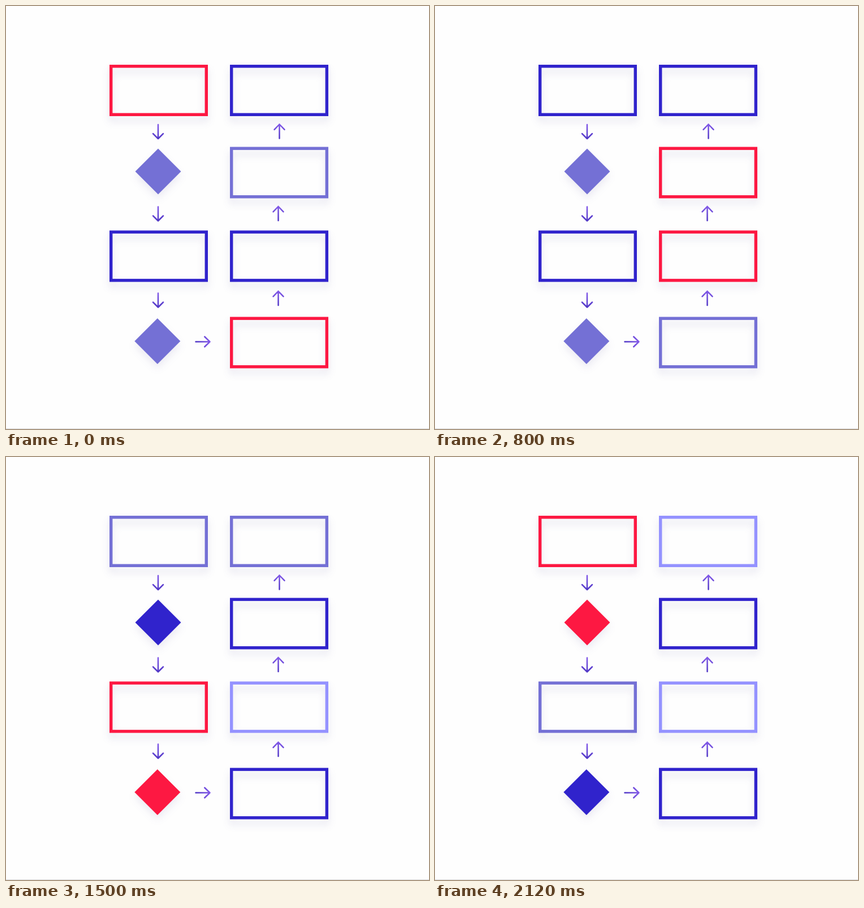
Animation, 748 px wide and 749 px high, one loop 2560 ms. Source, as an HTML page:

```html
<!DOCTYPE html>
<html lang="en">
<head>
<meta charset="utf-8">
<title>Flow chart</title>
<style>
  html, body { margin: 0; width: 100%; height: 100%; overflow: hidden; background: #fefefe; }
  svg { display: block; width: 748px; height: 749px; }
  .box { fill: none; stroke-width: 5.4; filter: drop-shadow(0 9px 7px rgba(50, 40, 130, .14)); }
  .gem { filter: drop-shadow(0 8px 7px rgba(50, 40, 130, .09)); }
  .arrow { fill: none; stroke: url(#ink); stroke-width: 2.5; stroke-linecap: round; stroke-linejoin: round; }
</style>
</head>
<body>
<svg id="stage" viewBox="0 0 748 749">
  <defs>
    <linearGradient id="ink" x1="0" y1="0" x2="0" y2="1">
      <stop offset="0" stop-color="#8259e8"/>
      <stop offset="1" stop-color="#5138c6"/>
    </linearGradient>
  </defs>
  <rect y="748" width="748" height="1" fill="#d9d9dc"/>
</svg>
<script>
const LOOP = 2560;
const COLORS = { r: '#fd1842', d: '#3023cc', l: '#7470d5', p: '#9492ff' };

// Cells follow the arrows, from top left round to top right.
const CELLS = [
  ['box', 183, 104], ['gem', 269, 293], ['box', 183, 397.5], ['gem', 267.8, 593.5],
  ['box', 396, 550.5], ['box', 396, 397.5], ['box', 396, 249.5], ['box', 396, 104]
];

// Start time and one colour key per cell.
const STEPS = [
  [0, 'rldlrdld'],
  [420, 'ldldrrdl'],
  [630, 'dldllrrd'],
  [840, 'ldlddlrr'],
  [1100, 'dldrldlr'],
  [1340, 'ldrrdpdl'],
  [1520, 'drrlldld'],
  [1680, 'rrlddpdp']
];

const DOWN = 'M0 0V25M-9 16L0 25L9 16';
const UP = 'M0 25V0M-9 9.3L0 0L9 9.3';
const ARROWS = [
  [DOWN, 269, 210], [DOWN, 269, 355.5], [DOWN, 269, 508.5],
  [UP, 483.5, 209.5], [UP, 481.5, 355], [UP, 481.5, 505],
  [UP, 360.5, 594.5, 90]
];

const stage = document.getElementById('stage');

function add(tag, attrs) {
  const node = document.createElementNS('http://www.w3.org/2000/svg', tag);
  for (const key in attrs) node.setAttribute(key, attrs[key]);
  return stage.appendChild(node);
}

const nodes = CELLS.map(([kind, x, y]) => kind === 'box'
  ? add('rect', { class: kind, x: x + 2.7, y: y + 2.7, width: 168.6, height: 85.6 })
  : add('path', { class: kind, d: `M${x} ${y - 40.5}l40.5 40.5l-40.5 40.5l-40.5 -40.5z` }));

for (const [d, x, y, turn = 0] of ARROWS) {
  add('path', { class: 'arrow', d, transform: `translate(${x} ${y}) rotate(${turn})` });
}

let shown = '';

function paint(keys) {
  if (keys === shown) return;
  shown = keys;
  nodes.forEach((node, i) => {
    const part = CELLS[i][0] === 'box' ? 'stroke' : 'fill';
    node.setAttribute(part, COLORS[keys[i]]);
  });
}

const start = performance.now();

function tick() {
  const t = (performance.now() - start) % LOOP;
  paint(STEPS.findLast(([at]) => at <= t)[1]);
  requestAnimationFrame(tick);
}

tick();
</script>
</body>
</html>
```
